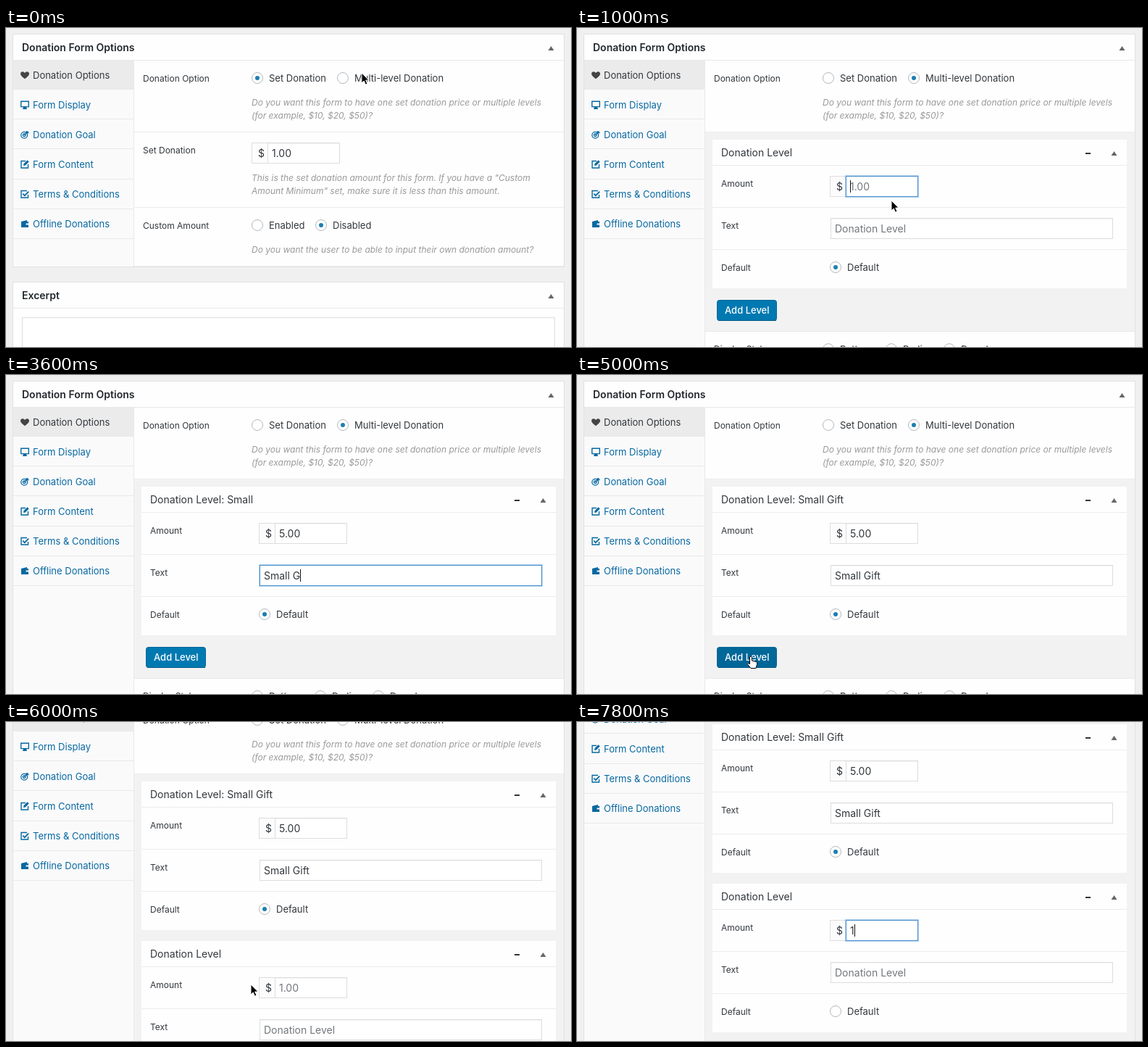
Animation of 780x440 px, one loop 8 s. Source, as an HTML page:

```html
<!DOCTYPE html>
<html lang="en">
<head>
<meta charset="utf-8">
<title>Donation form options</title>
<style>
  html, body { margin: 0; width: 100%; height: 100%; overflow: hidden; background: #f0f0f0; }
  svg { display: block; width: 780px; height: 440px; font-family: Inter, Roboto, sans-serif; }
  text { font-size: 13px; fill: #32373c; white-space: pre; }
  .head { font-size: 14px; font-weight: 600; fill: #23282d; }
  .title, .value { font-size: 14px; }
  .hint { font-size: 14px; fill: #72777c; }
  .label { font-size: 12px; }
  .desc { font-size: 12px; font-style: italic; fill: #999; }
  .link { fill: #0768a0; }
  .button { fill: #fff; font-weight: 500; }
</style>
</head>
<body>
<svg id="stage" viewBox="0 0 780 440"></svg>
<script>
const LOOP = 8000, STEP = 200;
const WHITE = '#fefefe', LINE = '#ececec', BORDER = '#ddd', BLUE = '#0768a0';
const stage = document.getElementById('stage');
const ruler = document.createElement('canvas').getContext('2d');
ruler.font = '14px Inter, Roboto, sans-serif';

// Pointer path: time, x, y, shape. The shape holds until the next key.
const pointer = [
  [0, 491, 62, 'arrow'], [400, 489, 66, 'arrow'], [600, 455, 165, 'arrow'],
  [800, 426, 222, 'beam'], [1000, 434, 238, 'arrow'], [1400, 434, 238, ''],
  [1800, 436, 255, 'arrow'], [2000, 441, 276, 'beam'], [2600, 441, 276, ''],
  [4400, 441, 276, 'beam'], [4600, 350, 335, 'arrow'], [4800, 262, 382, 'arrow'],
  [5000, 240, 389, 'hand'], [5400, 262, 384, 'arrow'], [5800, 320, 371, 'arrow'],
  [6000, 338, 362, 'arrow'], [6200, 356, 354, 'beam'], [6600, 372, 330, 'beam'],
  [7000, 411, 288, 'beam'], [7600, 411, 288, '']
];
const amountSteps = [[0, ''], [1400, '5'], [1600, '5.0'], [1800, '5.00']];
const textSteps = [
  [0, ''], [2600, 'S'], [2800, 'Sm'], [3000, 'Sma'], [3200, 'Small'], [3400, 'Small '],
  [3600, 'Small G'], [3800, 'Small Gi'], [4000, 'Small Gif'], [4200, 'Small Gift']
];
const nextAmountSteps = [[0, ''], [7600, '1']];
const focusSteps = [[0, ''], [800, 'amount'], [2000, 'text'], [5000, ''], [7000, 'next']];
const scrollSteps = [[0, 0], [6000, 72], [6200, 151]];

const lastKey = (keys, t) => keys.filter(key => key[0] <= t).pop();
const at = (keys, t) => lastKey(keys, t)[1];

const rect = (x, y, w, h, fill, stroke = 'none') =>
  `<rect x="${x}" y="${y}" width="${w}" height="${h}" fill="${fill}" stroke="${stroke}"/>`;
const text = (x, y, str, cls = '') => `<text x="${x}" y="${y}" class="${cls}">${str}</text>`;
const hline = (x1, x2, y, color = LINE) => rect(x1, y, x2 - x1, 1, color);
const path = (d, fill, stroke = 'none', width = 1) =>
  `<path d="${d}" fill="${fill}" stroke="${stroke}" stroke-width="${width}"/>`;
const group = (x, y, body) => `<g transform="translate(${x} ${y})">${body}</g>`;
const toggle = (x, y) => path(`M${x - 4} ${y + 3}h8l-4-6z`, '#666');

function radio(x, y, on, label) {
  const dot = on ? `<circle cx="${x}" cy="${y}" r="3" fill="#1e7fb0"/>` : '';
  return `<circle cx="${x}" cy="${y}" r="7.5" fill="#fff" stroke="#b4b9be"/>${dot}` +
    text(x + 16, y + 5, label);
}

function field(x, y, w, value, hint, focused) {
  let out = rect(x + .5, y + .5, w - 1, 28, '#fff', BORDER) + hline(x + 1, x + w - 1, y + 1, '#f3f3f3');
  if (focused) {
    out += `<rect x="${x}" y="${y}" width="${w}" height="29" fill="none" stroke="#5b9dd9" stroke-opacity=".45" stroke-width="2"/>` +
      rect(x + .5, y + .5, w - 1, 28, 'none', '#4a91d0');
  }
  out += text(x + 6, y + 20, value || hint, value ? 'value' : 'hint');
  if (focused) out += rect(Math.round(x + 6 + ruler.measureText(value).width), y + 6, 1, 17, '#111');
  return out;
}

const money = (x, y, w, value, hint, focused) =>
  rect(x + .5, y + .5, 22, 28, '#fcfcfc', BORDER) + text(x + 9, y + 20, '$', 'value') +
  field(x + 22, y, w, value, hint, focused);

const icons = [
  path('M0 5.2C-3 2.8-6 .8-6-2C-6-5.2-2-6 0-3C2-6 6-5.2 6-2C6 .8 3 2.8 0 5.2z', '#444'),
  path('M-5.3-4.8h10.6v7.4h-10.6z', 'none', BLUE, 1.4) + path('M-2 3h4l1 3h-6z', BLUE),
  '<g fill="none" stroke="#0768a0" stroke-width="1.3"><circle cx="-.8" cy=".8" r="4.4"/>' +
    '<circle cx="-.8" cy=".8" r="1.8"/><path d="M-.8.8L4.5-4.5M2.5-5v2.5h3"/></g>',
  path('M1-4.5h-6v9.5h9.5v-5', 'none', BLUE, 1.4) + path('M-2 2l.5-2.7 5-5 2.2 2.2-5 5z', BLUE),
  path('M3-4.5h-8v9.5h9.5v-4', 'none', BLUE, 1.4) + path('M-2.8-.5l2.5 2.6 5.5-5.5', 'none', BLUE, 1.8),
  path('M-5-3l8-2v2h2v8h-10z', BLUE) + rect(1.5, -.5, 4, 2, '#fafafa')
];
const tabs = ['Donation Options', 'Form Display', 'Donation Goal', 'Form Content',
  'Terms &amp; Conditions', 'Offline Donations'];

function sidebar(bottom) {
  const rows = tabs.map((name, i) => {
    const y = 65 + 41 * i;
    return hline(10, 176, y + 19 + (i > 2), '#e9e9e9') + group(26, y, icons[i]) +
      text(37, y + 5, name, i ? 'link' : '');
  });
  return rect(10, 45, 166, bottom - 45, '#fafafb') + rect(10, 45, 166, 39, '#ebebeb') +
    rows.join('') + rect(176, 45, 1, bottom - 45, '#e9e9e9');
}

const panel = (top, height, title) =>
  rect(9.5, top + .5, 761, height, WHITE, '#e2e2e2') + hline(10, 770, top + 36, '#e9e9e9') +
  text(22, top + 24, title, 'head') + toggle(752.5, top + 20);

function level(y, name, amount, words, focus, isDefault) {
  return group(0, y, rect(187, 0, 572, 205, WHITE) +
    hline(187, 759, 35) + hline(187, 759, 93) + hline(187, 759, 151) +
    text(199, 23, 'Donation Level' + (name.trim() && ': ' + name), 'title') +
    rect(702, 18, 7, 2, '#333') + toggle(741.5, 19) +
    text(199, 65, 'Amount', 'label') + money(349, 50, 100, amount, '1.00', focus === 'amount') +
    text(199, 123, 'Text', 'label') + field(350, 108, 390, words, 'Donation Level', focus === 'text') +
    text(199, 181, 'Default', 'label') + radio(357, 176, isDefault, 'Default'));
}

const singleForm = () =>
  hline(177, 770, 143) + text(189, 173, 'Set Donation', 'label') + money(339, 158, 100, '1.00') +
  text(339, 211, 'This is the set donation amount for this form. If you have a "Custom', 'desc') +
  text(339, 229, 'Amount Minimum" set, make sure it is less than this amount.', 'desc') +
  hline(177, 770, 247) + text(189, 277, 'Custom Amount', 'label') +
  radio(347, 272, false, 'Enabled') + radio(435, 272, true, 'Disabled') +
  text(339, 310, 'Do you want the user to be able to input their own donation amount?', 'desc') +
  hline(177, 770, 328) +
  panel(350, 300, 'Excerpt') + rect(22.5, 399.5, 735, 100, '#fff', BORDER);

function levelForm(t) {
  const focus = at(focusSteps, t);
  const added = t >= 5200, shift = added ? 220 : 0;
  const pressed = t === 5000;
  return rect(177, 143, 593, 275 + shift, '#f2f2f2') + hline(177, 770, 143, '#ededed') +
    level(154, at(textSteps, Math.max(0, t - STEP)), at(amountSteps, t), at(textSteps, t), focus, true) +
    (added ? level(374, '', at(nextAmountSteps, t), '', focus === 'next' ? 'amount' : '', false) : '') +
    group(0, shift,
      `<rect x="193.5" y="375.5" width="82" height="28" rx="3" fill="${pressed ? '#006799' : '#0079b1'}" stroke="#006799"/>` +
      hline(195, 275, 403, '#005a87') + text(204, 394, 'Add Level', 'button') +
      hline(177, 770, 418, '#e9e9e9') + text(189, 447, 'Display Style', 'label') +
      radio(347, 443, true, 'Buttons') + radio(434, 443, false, 'Radios') +
      radio(514, 443, false, 'Dropdown'));
}

const shapes = {
  arrow: path('M0 0v14l3.2-3 2.3 5.2 2.5-1.1-2.3-5h4.3z', '#000', '#fff'),
  beam: ['#fff', '#111'].map((color, i) =>
    path('M-3.5-7.5Q0-7.5 0-5Q0-7.5 3.5-7.5M0-5V5M-3.5 7.5Q0 7.5 0 5Q0 7.5 3.5 7.5M-2 2h4',
      'none', color, i ? 1.3 : 3)).join(''),
  hand: path('M-1.5 0q1.5-2 3 0v5l6 1.5q2 1 1 4l-1.5 5h-7l-5-6q0-2 3.5 0z', '#fff', '#000')
};

function cursor(t) {
  const key = lastKey(pointer, t);
  if (!key[3]) return '';
  const next = pointer[pointer.indexOf(key) + 1] || key;
  const part = (t - key[0]) / (next[0] - key[0] || 1);
  return group(key[1] + (next[1] - key[1]) * part, key[2] + (next[2] - key[2]) * part, shapes[key[3]]);
}

function scene(t) {
  const multi = t >= 400, bottom = multi ? 900 : 329;
  return rect(0, 0, 780, 440, '#f0f0f0') + group(0, -at(scrollSteps, t),
    panel(8, bottom - 8, 'Donation Form Options') + sidebar(bottom) +
    text(189, 74, 'Donation Option', 'label') +
    radio(347, 69, !multi, 'Set Donation') + radio(465, 69, multi, 'Multi-level Donation') +
    text(339, 107, 'Do you want this form to have one set donation price or multiple levels', 'desc') +
    text(339, 125, '(for example, $10, $20, $50)?', 'desc') +
    (multi ? levelForm(t) : singleForm())) + cursor(t);
}

const start = performance.now();
let shown = -1;
function draw(now) {
  const t = Math.floor(Math.max(0, now - start) % LOOP / STEP) * STEP;
  if (t !== shown) stage.innerHTML = scene(shown = t);
  requestAnimationFrame(draw);
}
draw(start);
</script>
</body>
</html>
```
